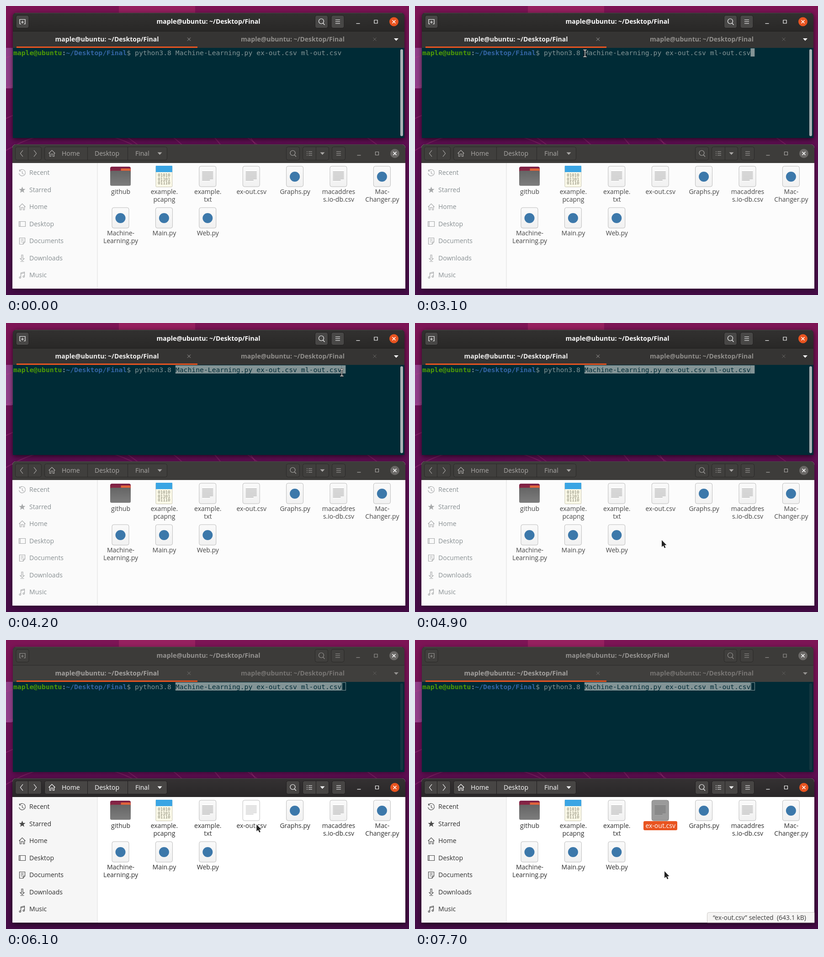
Recreate the animation shown at these times as an HTML page with a canvas. Size 882 by 635 pixels, loop 8 s.

```html
<!DOCTYPE html>
<html lang="en">
<head>
<meta charset="utf-8">
<title>Desktop session</title>
<style>
html, body { margin: 0; width: 882px; height: 635px; overflow: hidden; background: #5c0e50; }
canvas { display: block; }
</style>
</head>
<body>
<canvas id="stage" width="882" height="635"></canvas>
<script>
const ctx = document.getElementById('stage').getContext('2d');
const LOOP = 8000, STEP = 100;
const UI = '14px "Open Sans", "Noto Sans", sans-serif';
const BOLD = 'bold ' + UI;
const MONO = '14.73px "DejaVu Sans Mono", monospace';
const CELL = 8.87, LEFT = 16, ROW = 93;
const ORANGE = '#e95420', TERM_BG = '#002b36', TERM_FG = '#839496';
const PROMPT = 'maple@ubuntu:~/Desktop/Final$ ';
const LINE = PROMPT + 'python3.8 Machine-Learning.py ex-out.csv ml-out.csv';
const SEL_START = PROMPT.length + 10;
const TITLE = 'maple@ubuntu: ~/Desktop/Final';

// pointer path: time, x, y
const POINTER = [
  [400, 640, 174], [1200, 594, 109], [1700, 544, 102], [1800, 544, 102], [1900, 551, 103],
  [2200, 548, 103], [2300, 400, 105], [2400, 343, 106], [3000, 343, 106], [3100, 372, 104],
  [3400, 372, 104], [3500, 400, 101], [3700, 712, 107], [3800, 738, 114], [3900, 741, 118],
  [4000, 741, 118], [4200, 735, 109], [4600, 734, 108], [4700, 700, 190], [4900, 540, 477],
  [5200, 540, 477], [5400, 551, 463], [5800, 525, 432], [5900, 525, 432], [6200, 560, 392],
  [6600, 761, 392], [6800, 755, 399], [7100, 281, 432], [7300, 538, 380], [7400, 540, 384],
  [7700, 546, 508]
];
const BLINK_ON = [[400, 1000], [1700, 2400], [3100, 3700], [4200, 5300]];
const FILES = [
  ['folder', 'github'], ['capture', 'example.', 'pcapng'], ['text', 'example.', 'txt'],
  ['text', 'ex-out.csv'], ['python', 'Graphs.py'], ['text', 'macaddres', 's.io-db.csv'],
  ['python', 'Mac-', 'Changer.py'], ['python', 'Machine-', 'Learning.py'],
  ['python', 'Main.py'], ['python', 'Web.py']
];
const ICON = {
  search: 'M3.5 3.5L7 7M5-1A5.5 5.5 0 1 1-6-1A5.5 5.5 0 1 1 5-1',
  menu: 'M-5-4H5M-5 0H5M-5 4H5',
  list: 'M-6-4H-4M-2-4H6M-6 0H-4M-2 0H6M-6 4H-4M-2 4H6',
  newTab: 'M-6 5V-5H6V5H3M-6 5H-3M0-2V4M-3 1H3',
  minimize: 'M-4 4H4',
  maximize: 'M-3.5-3.5H3.5V3.5H-3.5Z',
  close: 'M-3.5-3.5L3.5 3.5M3.5-3.5L-3.5 3.5',
  back: 'M2.5-7L-3 0L2.5 7',
  forward: 'M-2.5-7L3 0L-2.5 7',
  home: 'M-7 0L0-7L7 0M-5-1.5V6.5H-2V1H2V6.5H5V-1.5',
  beam: 'M-3.5-7.5H-1L0-6.5L1-7.5H3.5M-3.5 7.5H-1L0 6.5L1 7.5H3.5M0-6.5V6.5'
};
const DOWN = 'M-5-2.5H5L0 3Z';
const ARROW = 'M0 0V15L3.5 12L6 17.5L8.5 16.5L6 11H10.5Z';
const STAR = 'M0-7L2-2H7L3 1.5L4.5 6.5L0 3.5L-4.5 6.5L-3 1.5L-7-2H-2Z';
const PLACES = [
  ['Recent', 'M-6-4A7 7 0 1 1-7 1M-6-7V-3.5H-2.5M0-3.5V1L3 3'],
  ['Starred', STAR],
  ['Home', ICON.home],
  ['Desktop', 'M-7-5.5H7V5.5H-7ZM-4.5-5.5V5.5'],
  ['Documents', 'M-6-7H6V2L2 7H-6ZM-3-4H3M-3-1H3M-3 2H0M2 7V2H6'],
  ['Downloads', 'M-1.5-7V1H-4.5L0 5.5L4.5 1H1.5V-7ZM-4 7.5H4'],
  ['Music', 'M-3 5V-5L5-7V3M-3-3L5-5M-3 5A1.7 1.7 0 1 1-6.4 5A1.7 1.7 0 1 1-3 5M5 3A1.7 1.7 0 1 1 1.6 3A1.7 1.7 0 1 1 5 3']
];

const clamp = (v, lo, hi) => Math.min(hi, Math.max(lo, v));

function mix(a, b, k) {
  const part = (c, i) => parseInt(c.slice(i, i + 2), 16);
  return `rgb(${[1, 3, 5].map(i => Math.round(part(a, i) + (part(b, i) - part(a, i)) * k))})`;
}

function gradient(y0, y1, ...colors) {
  const g = ctx.createLinearGradient(0, y0, 0, y1);
  colors.forEach((c, i) => g.addColorStop(i / (colors.length - 1), c));
  return g;
}

function rect(x, y, w, h, fill) {
  ctx.fillStyle = fill;
  ctx.fillRect(x, y, w, h);
}

function box(x, y, w, h, radius, fill, stroke) {
  ctx.beginPath();
  ctx.roundRect(x, y, w, h, radius);
  ctx.fillStyle = fill;
  ctx.fill();
  if (!stroke) return;
  ctx.strokeStyle = stroke;
  ctx.lineWidth = 1;
  ctx.stroke();
}

function disc(x, y, r, fill) {
  ctx.beginPath();
  ctx.arc(x, y, r, 0, 7);
  ctx.fillStyle = fill;
  ctx.fill();
}

function shape(path, x, y, { fill, stroke, width = 1.2 }) {
  ctx.save();
  ctx.translate(x, y);
  const p = new Path2D(path);
  if (fill) { ctx.fillStyle = fill; ctx.fill(p); }
  if (stroke) { ctx.strokeStyle = stroke; ctx.lineWidth = width; ctx.stroke(p); }
  ctx.restore();
}

const glyph = (name, x, y, stroke, width) => shape(ICON[name], x, y, { stroke, width });

function text(s, x, y, color, font = UI, align = 'left') {
  ctx.font = font;
  ctx.textAlign = align;
  ctx.fillStyle = color;
  ctx.fillText(s, x, y);
}

function pointerAt(t) {
  if (t < POINTER[0][0]) return null;
  const i = POINTER.findIndex(p => p[0] > t);
  if (i < 0) return POINTER[POINTER.length - 1].slice(1);
  const [t0, x0, y0] = POINTER[i - 1], [t1, x1, y1] = POINTER[i];
  const k = (t - t0) / (t1 - t0);
  return [x0 + (x1 - x0) * k, y0 + (y1 - y0) * k];
}

function windowShape(x, y, w, h, fill, strength) {
  ctx.save();
  ctx.shadowColor = `rgba(0,0,0,${strength})`;
  ctx.shadowBlur = 12;
  ctx.shadowOffsetY = 3;
  box(x, y, w, h, [8, 8, 0, 0], fill);
  ctx.restore();
}

function closeButton(x, y, lit) {
  disc(x, y, 10, mix('#6b6967', ORANGE, lit));
  glyph('close', x, y, '#ffffff', 1.6);
}

function drawWallpaper() {
  rect(0, 0, 882, 635, gradient(0, 635, '#7d1455', '#5f0d53', '#440b46'));
  rect(247, 0, 167, 15, '#96205f');
  box(-5, 92, 22, 89, [0, 0, 6, 0], '#93418b');
  ctx.strokeStyle = 'rgba(190,70,140,.3)';
  ctx.lineWidth = 2;
  for (let i = 0; i < 4; i++) {
    ctx.beginPath();
    ctx.arc(150, 560, 285 + i * 62, 3, 6.2);
    ctx.stroke();
  }
  for (let i = 0; i < 3; i++) {
    ctx.beginPath();
    ctx.moveTo(265 + i * 262, 288);
    ctx.lineTo(290 + i * 262, 306);
    ctx.stroke();
  }
}

function drawTerminal(t, idle, pointer) {
  const fg = mix('#ffffff', '#959391', idle);
  windowShape(15, 15, 857, 275, TERM_BG, .65 - idle * .25);
  box(15, 15, 857, 40, [8, 8, 0, 0], gradient(15, 55, mix('#323130', '#3c3b39', idle), mix('#292827', '#3c3b39', idle)));
  rect(20, 15, 847, 1, mix('#4a4847', '#4c4b49', idle));
  for (const [x, icon] of [[22, 'newTab'], [676.5, 'search'], [712, 'menu']]) {
    box(x, 20.5, 28, 28, 4, mix('#484746', '#403f3d', idle), mix('#201f1f', '#2a2928', idle));
    glyph(icon, x + 14, 34.5, fg);
  }
  text(TITLE, 443, 39, fg, BOLD, 'center');
  glyph('minimize', 770.5, 34.5, fg);
  glyph('maximize', 809.5, 34.5, fg);
  closeButton(849, 34.5, clamp((5800 - t) / 300, 0, 1));

  rect(15, 55, 857, 37, mix('#353433', '#403f3d', idle));
  rect(15, 55, 857, 1, mix('#1f1e1e', '#2c2b2a', idle));
  rect(23, 89, 396, 3, ORANGE);
  text(TITLE, 221, 78, mix('#f2f1f0', '#a3a19f', idle), BOLD, 'center');
  text(TITLE, 627.5, 78, mix('#918f8c', '#777573', idle), BOLD, 'center');
  glyph('close', 400.5, 73, mix('#a5a3a1', '#777573', idle), 1);
  glyph('close', 807, 73, mix('#686664', '#5d5b59', idle), 1);
  shape(DOWN, 854, 73.5, { fill: fg });
  box(863, 95, 6, 191, 3, mix('#aab2b5', '#143740', idle));
  drawPrompt(t, pointer);
}

function drawPrompt(t, pointer) {
  const selecting = t >= 3500;
  const wraps = t >= 3900 && t < 4200;
  let end = LINE.length;
  if (selecting && t < 3800) end = clamp(Math.round((pointer[0] - 14 - LEFT) / CELL), SEL_START, end);
  if (selecting) {
    const right = wraps ? 859 : LEFT + end * CELL;
    const start = LEFT + SEL_START * CELL;
    rect(start, ROW, right - start, 18, TERM_FG);
    if (wraps) rect(LEFT, ROW + 18, 719, 17, TERM_FG);
  }
  [...LINE].forEach((ch, i) => {
    const selected = selecting && i >= SEL_START && i < end;
    const color = selected ? TERM_BG : i < 12 ? '#4e9a06' : i > 12 && i < 28 ? '#3465a4' : TERM_FG;
    text(ch, LEFT + i * CELL, 107.5, color, (i < 28 ? 'bold ' : '') + MONO);
  });
  const x = LEFT + LINE.length * CELL;
  if (t >= 5300) {
    ctx.strokeStyle = TERM_FG;
    ctx.lineWidth = 1;
    ctx.strokeRect(735.5, 93.5, 8, 17);
  } else if (BLINK_ON.some(([on, off]) => t >= on && t < off)) {
    rect(x, ROW, CELL, 18, TERM_FG);
  }
}

function drawFileIcon(kind, x, y, selected, hover) {
  if (kind === 'folder') {
    box(x - 22.5, y - 22, 45, 40, 4, gradient(y - 22, y + 5, '#7c1f47', '#a83c3c'));
    rect(x + 1, y - 18, 21, 8, '#e0633a');
    box(x - 22.5, y - 13, 45, 33, 3, gradient(y - 13, y + 20, '#656565', '#7d7d7d'));
  } else if (kind === 'capture') {
    box(x - 18, y - 23.5, 36, 46, 2, '#fbf9e8', '#c9c7b4');
    rect(x - 18, y - 24, 36, 14, '#3aa5e4');
    ['01010', '01101', '01110'].forEach((s, i) =>
      text(s, x, y + i * 8.7, '#83826f', '9px "DejaVu Sans Mono", monospace', 'center'));
  } else {
    box(x - 18.5, y - 23, 37, 45, 4, selected ? '#9b9b9b' : hover ? '#ffffff' : gradient(y - 23, y + 22, '#fafafa', '#f1f1f1'),
      selected ? '#858585' : '#bdbdbd');
    if (kind === 'python') disc(x, y, 11, '#3c78aa');
    else {
      for (let i = 0; i < 7; i++) {
        rect(x - 12, y - 11 + i * 3, i === 6 ? 17 : 24, 1, selected ? '#666666' : hover ? '#b0b0b0' : '#949494');
      }
    }
  }
}

function drawFiles(t, focus, pointer) {
  const fg = mix('#aaa8a6', '#ffffff', focus);
  const edge = mix('#2a2928', '#201e1f', focus);
  const face = mix('#403f3d', '#474544', focus);
  windowShape(14, 304, 860, 317, '#ffffff', .4 + focus * .25);
  box(14, 304, 860, 41, [8, 8, 0, 0], gradient(304, 345, mix('#3d3c3a', '#343132', focus), mix('#3d3c3a', '#292728', focus)));
  rect(20, 304, 848, 1, '#4b494a');
  for (const [x, w, ...splits] of [[20.5, 57, 48.5], [84.5, 268, 178.5, 266.5], [613.5, 29], [649.5, 57, 678.5], [713.5, 29]]) {
    box(x, 309.5, w, 29, 4, face, edge);
    splits.forEach(s => rect(s - .5, 310, 1, 28, edge));
  }
  for (const [icon, x] of [['back', 34.5], ['forward', 63.5], ['home', 100.5], ['search', 628], ['list', 664],
    ['menu', 728], ['minimize', 772.5], ['maximize', 812]]) glyph(icon, x, 324, fg);
  for (const [label, x] of [['Home', 122], ['Desktop', 194], ['Final', 283]]) text(label, x, 329, fg);
  shape(DOWN, 336.5, 324, { fill: fg });
  shape(DOWN, 692.5, 324, { fill: fg });
  closeButton(851, 324, focus);

  rect(14, 345, 860, 276, mix('#fcfcfc', '#ffffff', focus));
  rect(14, 345, 186, 276, mix('#fafafa', '#f6f6f6', focus));
  rect(199.5, 345, 1, 276, '#dddddd');
  const ink = mix('#899093', '#2f2f2f', focus);
  const mark = mix('#a8aaab', '#4b4b4b', focus);
  PLACES.forEach(([label, path], i) => {
    const y = 366.5 + i * 37.5;
    shape(path, 35.5, y, path === STAR ? { fill: mark } : { stroke: mark });
    text(label, 51, Math.round(y + 4.5), ink);
  });

  FILES.forEach(([kind, ...lines], i) => {
    const x = 250.5 + (i % 7) * 95.4, y = 375 + Math.floor(i / 7) * 91;
    const selected = i === 3 && t >= 7400;
    const hover = t >= 5300 && Math.abs(pointer[0] - x) < 37 && pointer[1] > y - 22 && pointer[1] < y + 38 + lines.length * 9;
    drawFileIcon(kind, x, y, selected, hover);
    if (selected) box(500, 398, 74, 20, 3, ORANGE);
    lines.forEach((s, n) => text(s, x + .5, y + 38 + n * 16.5,
      selected ? '#ffffff' : mix('#464646', '#2d2d2d', focus), UI, 'center'));
  });
  if (t >= 7500) {
    box(639.5, 598.5, 234.5, 22.5, [4, 0, 0, 0], '#f5f4f3', '#cdcac7');
    text('“ex-out.csv” selected  (643.1 kB)', 652, 615, '#3d3d3d');
  }
}

function drawPointer([x, y]) {
  if (y < 290) {
    glyph('beam', x, y, '#000000', 3.2);
    glyph('beam', x, y, '#ffffff', 1.3);
  } else {
    shape(ARROW, x, y, { stroke: '#ffffff', width: 2 });
    shape(ARROW, x, y, { fill: '#222222' });
  }
}

function render(now) {
  const t = Math.floor((now % LOOP) / STEP) * STEP;
  const focus = clamp((t - 5200) / 200, 0, 1);
  const pointer = pointerAt(t);
  drawWallpaper();
  drawTerminal(t, focus, pointer);
  drawFiles(t, focus, pointer);
  if (pointer) drawPointer(pointer);
}

const start = performance.now();
function tick() {
  render(performance.now() - start);
  requestAnimationFrame(tick);
}
tick();
</script>
</body>
</html>
```
